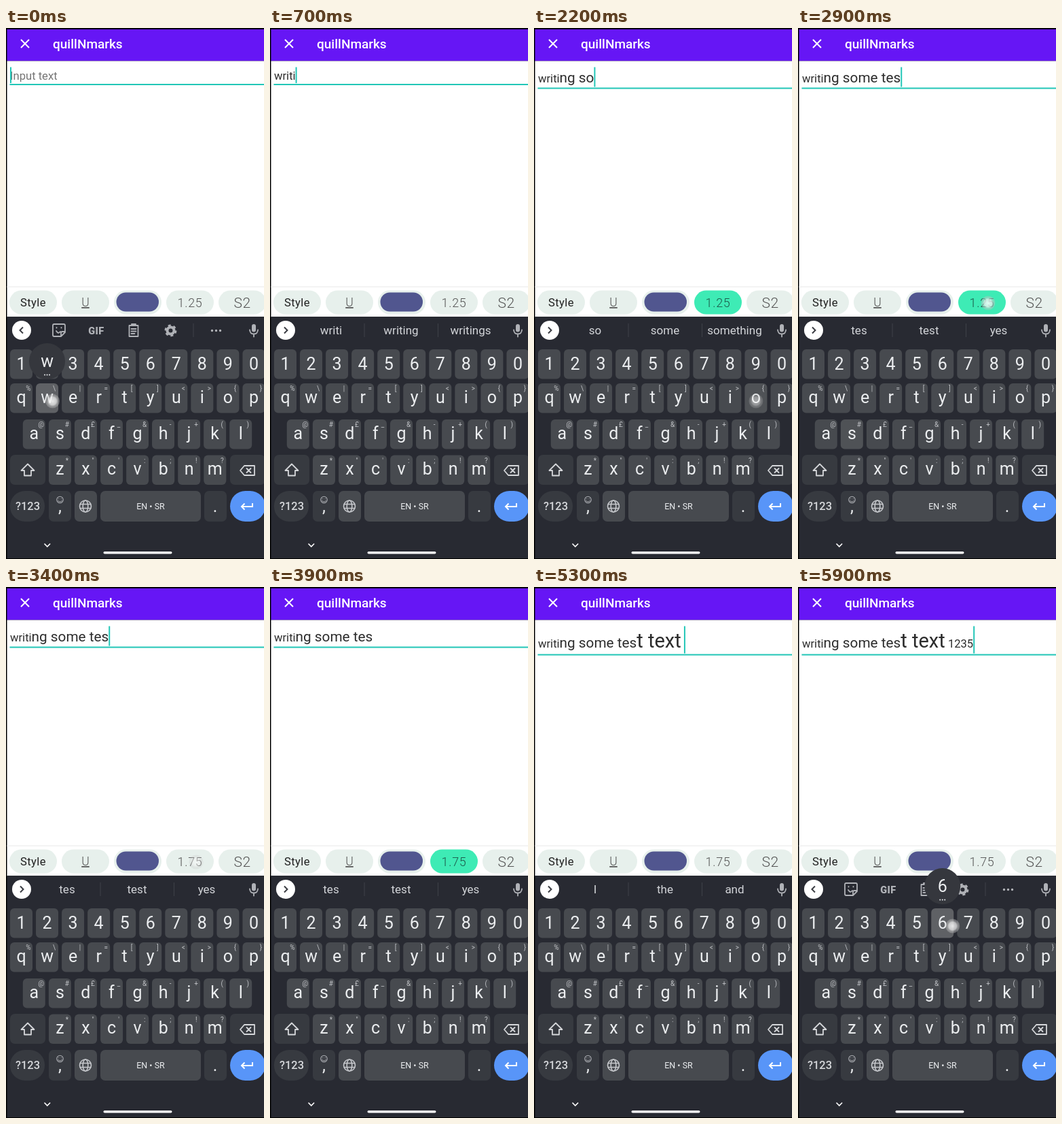
An HTML page that plays this animation: 380x780 px, repeating every 6 s.

```html
<!DOCTYPE html>
<html lang="en">
<head>
<meta charset="utf-8">
<style>
  html, body { margin: 0; width: 100%; height: 100%; overflow: hidden; background: #000; }
  svg { display: block; width: 380px; height: 780px; font-family: Roboto, sans-serif; }
  text { white-space: pre; }
  .mid { text-anchor: middle; }
  .line { fill: none; stroke: #b0b2b7; stroke-width: 1.8; stroke-linecap: round; stroke-linejoin: round; }
  .key { fill: #474a4f; }
  .dark { fill: #373a40; }
  .label { fill: #eceef0; font-size: 25px; text-anchor: middle; }
  .hint { fill: #bfc1c5; font-size: 10px; text-anchor: middle; }
  .chip { fill: #e7f0ec; }
  .word { fill: #d3d5d9; font-size: 17px; text-anchor: middle; }
</style>
</head>
<body>
<svg id="stage" viewBox="0 0 380 780">
  <defs>
    <radialGradient id="glow">
      <stop offset="0" stop-color="#fff" stop-opacity=".85"/>
      <stop offset=".55" stop-color="#eee" stop-opacity=".75"/>
      <stop offset=".75" stop-color="#ccc" stop-opacity=".5"/>
      <stop offset="1" stop-color="#bbb" stop-opacity=".35"/>
    </radialGradient>
  </defs>
  <rect width="380" height="780"/>
  <rect x="1.5" y="2" width="379" height="46.5" fill="#6616f5"/>
  <path d="M22 17l12 12M34 17l-12 12" stroke="#fff" stroke-width="2"/>
  <text x="69" y="29.5" fill="#fff" font-size="19" font-weight="500">quillNmarks</text>
  <rect x="1.5" y="48.5" width="379" height="376" fill="#fff"/>

  <rect id="underline" x="5.5" width="375" height="2" fill="#22c6b7"/>
  <text id="hint" x="6" y="76" font-size="16.6" fill="#757575">Input text</text>
  <text id="typed" x="6" fill="#2c2c2c"></text>
  <rect id="cursor" y="57.5" width="2" fill="#22c6b7"/>

  <rect x="1.5" y="379.5" width="379" height="1.5" fill="#f0f0f0"/>
  <g id="chips"></g>
  <rect x="1.5" y="424" width="379" height="355" fill="#282a32"/>

  <circle cx="23" cy="444" r="14" fill="#fff"/>
  <path id="arrow" fill="none" stroke="#3a3c42" stroke-width="2"/>
  <g id="tools">
    <path class="line" d="M71 435h14q2 0 2 2v10l-6 6h-10q-2 0-2-2v-14q0-2 2-2zM87 446h-4q-2 0-2 2v5M74 445q3 5 6 1M74.500 440v.5M81.500 440v.5"/>
    <text class="mid" x="133" y="449.500" font-size="14.500" font-weight="900" fill="#b0b2b7" letter-spacing=".4">GIF</text>
    <path class="line" d="M181.500 437h13v16h-13zM185 437v-2h6v2M184.500 442h7M184.500 445.500h7M184.500 449h5"/>
    <circle cx="242.500" cy="444.500" r="5" fill="none" stroke="#b0b2b7" stroke-width="4"/>
    <circle cx="242.500" cy="444.500" r="7.700" fill="none" stroke="#b0b2b7" stroke-width="2.500" stroke-dasharray="4.030"/>
    <path d="M276 434v20" stroke="#3e4148"/>
    <path d="M303.500 444.500h.01M309.500 444.500h.01M315.500 444.500h.01" class="line" style="stroke-width:3.500"/>
  </g>
  <g id="words">
    <path d="M139 434v20M247.500 434v20" stroke="#3e4148"/>
    <text class="word" x="90" y="450"></text>
    <text class="word" x="193" y="450"></text>
    <text class="word" x="295.500" y="450"></text>
  </g>
  <rect x="362" y="435" width="6" height="11.500" rx="3" fill="#b0b2b7"/>
  <path class="line" d="M359 443.500q.5 6 6 6t6-6M365 449.500v4"/>

  <g id="keys"></g>

  <path class="line" style="stroke:#d5d7da" d="M32 640.500l9.500 9.500h-4.500v7.500h-10v-7.500h-4.500z"/>
  <path class="line" style="stroke:#d5d7da" d="M351 643h15v14h-15l-6-7zM354.500 647l6 6M360.500 647l-6 6"/>
  <text class="mid" x="32" y="707.500" font-size="16.500" font-weight="500" fill="#d5d7da">?123</text>
  <g class="line" style="stroke-width:1.100">
    <circle cx="79.500" cy="693" r="4.700"/>
    <path d="M77 694.500q2.500 3 5 0M77.800 691.500v.2M81.200 691.500v.2"/>
  </g>
  <text class="label" x="79.500" y="711" font-size="20">,</text>
  <g class="line" style="stroke:#c6c8cc;stroke-width:1.600">
    <circle cx="117" cy="702.500" r="8.500"/>
    <ellipse cx="117" cy="702.500" rx="3.800" ry="8.500"/>
    <path d="M109.500 699.500h15M109.500 705.500h15"/>
  </g>
  <text class="mid" x="213" y="707" font-size="12.500" fill="#eceef0">EN • SR</text>
  <text class="label" x="308" y="711">.</text>
  <path d="M363 698v5h-15.500M351.500 698.500l-4.500 4.500 4.500 4.500" fill="none" stroke="#fff" stroke-width="2"/>
  <path d="M56.500 757.500l4.300 4.300 4.300-4.300" fill="none" stroke="#fff" stroke-width="1.600"/>
  <rect x="143.500" y="769" width="101" height="3.600" rx="1.800" fill="#fff"/>

  <g id="popup">
    <circle r="26.500" fill="#35373d"/>
    <text class="label" y="8"></text>
    <path d="M-3.500 20h.01M0 20h.01M3.500 20h.01" stroke="#eceef0" stroke-width="2" stroke-linecap="round"/>
  </g>
  <circle id="touch" r="10.500" fill="url(#glow)"/>
</svg>
<script>
const $ = id => document.getElementById(id);
const LOOP = 6000, STEP = 100, HOLD = 0.7, FADE = 1.7, BASE = 16.6;

const box = (x, y, w, h, r, attrs) =>
  `<rect x="${x}" y="${y}" width="${w}" height="${h}" rx="${r}" ${attrs}/>`;

// Formatting chips
const chip = (x, attrs = '') => box(x, 385.5, 70, 35, 17.5, `class="chip" ${attrs}`);
$('chips').innerHTML = [5, 82, 159].map(x => chip(x)).join('') +
  chip(236, 'id="sizeChip"') + chip(313) +
  box(162.5, 388.5, 62.5, 28, 14, 'fill="#51568f"') +
  `<g class="mid" fill="#555" font-weight="300">
    <text x="40" y="409" font-size="16.6" font-weight="400" fill="#222" letter-spacing=".4">Style</text>
    <text x="117" y="409" font-size="17.5" text-decoration="underline">U</text>
    <text id="sizeText" x="271" y="409.500" font-size="18" letter-spacing=".7"></text>
    <text x="348" y="411" font-size="21" letter-spacing=".5">S2</text>
  </g>`;

// Keyboard
const PITCH = 38.05, keys = {};
const rows = [
  ['1234567890', '', 22.5, 493.5, 8.5],
  ['qwertyuiop', '%\\|=[]<>{}', 22.5, 543.5, 7],
  ['asdfghjkl', '@#£_&-+()', 41.3, 596.5, 7],
  ['zxcvbnm', '*"\':;!?', 79.5, 649, 7],
];
const safe = c => c.replace('<', '&lt;').replace('&', c === '&' ? '&amp;' : '&');
let board = box(6, 627, 52, 44, 7, 'class="dark"') + box(330, 627, 52, 44, 7, 'class="dark"') +
  box(6, 680, 51, 45, 22, 'class="dark"') + box(63, 680, 33, 45, 7, 'class="dark"') +
  box(101, 680, 33, 45, 7, 'class="key"') + box(139, 680, 148, 45, 7, 'class="key"') +
  box(292, 680, 33, 45, 7, 'class="dark"') + box(330, 680, 52, 45, 22.5, 'fill="#5895f8"');
for (const [chars, hints, x0, y, drop] of rows) {
  [...chars].forEach((c, i) => {
    const x = x0 + i * PITCH;
    keys[c] = { x, y };
    board += box(x - 16.5, y - 21.5, 33, 43.5, 6, `class="key" id="key-${c}"`) +
      `<text class="label" x="${x}" y="${y + drop}">${c}</text>` +
      (hints ? `<text class="hint" x="${x + 10.5}" y="${y - 10.5}">${safe(hints[i])}</text>` : '');
  });
}
$('keys').innerHTML = board;
const spots = { ' ': [220, 706], del: [367, 662], size: [280, 404] };

// Taps: step, key, optional horizontal finger offset
const taps = [
  [0, 'w', 8], [1, 'r'], [2, 'i'], [4, 't'], [5, 'i'], [8, 'size'],
  [10, 'n'], [12, 'g'], [13, ' '], [15, 'i'], [17, 'del'],
  [19, 's'], [21, 'o', 0], [23, 'm'], [24, 'e'], [25, ' '], [26, 't'], [27, 'e'], [27.9, 's'],
  [29, 'size'], [31, 'size'], [33, 'size'], [35, 'size'],
  [40, 't'], [41, ' '], [44.3, 't'], [45.3, 'e'], [46, 'x', -5], [48, 't'],
  [50, 'size'], [52, ' '], [54.3, '1'], [56, '2'], [57, '3'], [58, '5'], [59, '6', 15],
];
// Size chip: step, value, active
const sizes = [
  [0, 1.25, 0], [9, 1.25, 1], [30, 1.25, 0], [32, 1.5, 0], [34, 1.75, 0], [36, 1.75, 1], [51, 1.75, 0],
];
const blinks = [[36, 38], [39, 40], [42, 43]];
const guesses = {
  '': 'I the and', w: 'w with we', wr: 'wr write wrong', wri: 'wri write writing',
  writ: 'writ write writing', writi: 'writi writing writings', writin: 'writin writing writings',
  writing: 'writing writings written', i: 'i I in', s: 's so some', so: 'so some something',
  som: 'som some something', some: 'some something sometimes', t: 't the to', te: 'te ten tell',
  tes: 'tes test yes', test: 'test tests testing', tex: 'tex text textdue...7dudu', text: 'text texts texting',
};

const last = (list, step) => list.filter(e => e[0] <= step).pop();
const show = (node, on) => node.setAttribute('visibility', on ? 'visible' : 'hidden');
const set = (node, attrs) => { for (const k in attrs) node.setAttribute(k, attrs[k]); };

function typedAt(step) {
  const out = [];
  for (const [at, key] of taps) {
    if (step < at + HOLD) break;
    if (key === 'del') out.pop();
    else if (key !== 'size') {
      const [, value, on] = last(sizes, at + HOLD);
      out.push([key, on ? value : 1]);
    }
  }
  return out;
}

function drawText(step) {
  const chars = typedAt(step), node = $('typed');
  let html = '', prev = 0;
  for (const [c, scale] of chars) {
    if (scale !== prev) html += `${prev ? '</tspan>' : ''}<tspan font-size="${BASE * scale}">`;
    html += c;
    prev = scale;
  }
  node.innerHTML = html + (prev ? '</tspan>' : '');
  const grow = BASE * (Math.max(1, ...chars.map(c => c[1])) - 1);
  const lineY = 83 + grow * 1.327;
  node.setAttribute('y', 76 + grow * 1.056);
  set($('underline'), { y: lineY - 1 });
  const width = chars.length ? node.getComputedTextLength() : 0;
  set($('cursor'), { x: 6 + width, height: lineY - 59.5 });
  show($('cursor'), !blinks.some(([a, b]) => step >= a && step < b));
  show($('hint'), !chars.length);
  return chars.map(c => c[0]).join('');
}

function drawStrip(text) {
  const word = text.split(' ').pop();
  const tools = !text || /\d/.test(word);
  show($('tools'), tools);
  show($('words'), !tools);
  $('arrow').setAttribute('d', tools ? 'M25 439.500l-4.500 4.500 4.500 4.500' : 'M21 439.500l4.500 4.500-4.500 4.500');
  const list = (guesses[word] || guesses['']).split(' ');
  document.querySelectorAll('.word').forEach((node, i) => {
    const long = list[i].length > 12;
    node.textContent = list[i];
    node.style.fontSize = long ? '13.5px' : '17px';
    node.style.letterSpacing = long ? '-.7px' : '0';
  });
}

function drawTouch(step) {
  const [at, key, dx = 6] = last(taps, step);
  const age = step - at, held = age < HOLD, k = keys[key];
  const [x, y] = spots[key] || [k.x + dx, k.y + (dx < 0 ? -3 : 4.5)];
  set($('touch'), { cx: x, cy: y, opacity: held ? 1 : 0.6 });
  show($('touch'), held || (age < FADE && key !== ' '));
  show($('popup'), held && k);
  if (k) {
    $('popup').setAttribute('transform', `translate(${k.x} ${k.y - 54})`);
    $('popup').querySelector('text').textContent = key;
  }
  for (const c in keys) $('key-' + c).style.fill = '';
  for (const [t, c] of taps) {
    const d = step - t;
    if (keys[c] && d >= 0 && d < FADE) $('key-' + c).style.fill = d < HOLD ? '#5f6165' : '#4f5256';
  }
}

function render(step) {
  drawStrip(drawText(step));
  drawTouch(step);
  const [, value, on] = last(sizes, step);
  $('sizeText').textContent = value;
  $('sizeText').style.fill = on ? '#1d5a4b' : '';
  $('sizeChip').style.fill = on ? '#3eebb5' : '';
}

let shown = -1;
const start = performance.now();
function tick() {
  const step = Math.floor(((performance.now() - start) % LOOP) / STEP);
  if (step !== shown) render(shown = step);
  requestAnimationFrame(tick);
}
tick();
</script>
</body>
</html>
```
